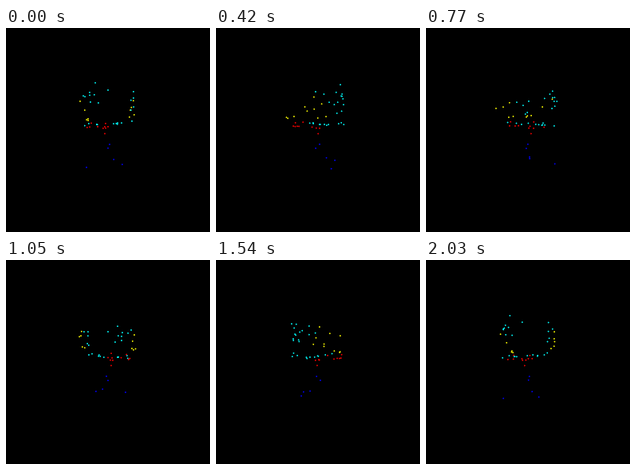
These frames come from a looping animation (256 by 256 pixels, 2100 ms). A matplotlib script:

```python
import numpy as np
import matplotlib.pyplot as plt
from matplotlib.animation import FuncAnimation

SIZE, FRAMES, INTERVAL = 256, 30, 70
FOCAL = SIZE / 2 / np.tan(np.pi / 6)   # 60 degree field of view
RADIUS = 0.01 * SIZE / 2

CYAN, YELLOW, RED, BLUE = (0, 1, 1), (1, 1, 0), (1, 0, 0), (0, 0, 1)

# Chair samples: (right, up, towards viewer), in pixels at the turning axis
BACK = [
    (-13.7, 51, 31), (0, 43.2, 30.5), (-30, 41.4, 7), (-26.9, 38.8, 15.5),
    (-20.2, 41.4, 27.5), (-19.5, 37.1, 33), (-14.7, 37.7, 33),
    (-19.2, 30.5, 29), (-10.3, 28.8, 34), (28.1, 42.4, 26.6),
    (31, 39, 6.5), (26.9, 34.9, 14.8), (28.7, 25.7, 24.6), (26.3, 22.8, 18.5),
]
SEAT = [
    (26.7, 9.9, 24.6), (18.4, 9.5, -18), (10.8, 8.5, -10), (10.7, 7.9, 24),
    (6, 6.7, 31.5), (11.8, 7.3, -0.8), (-24, 8, 2), (-26.8, 5, 18.5),
    (-13, 6.3, 17), (-13.5, 6.5, 12.3), (-13, 6.5, 6),
]
ARMS = [
    (32.5, 37.5, -5), (31.5, 30.4, -16), (31.5, 27.8, -27), (28, 17, -9.5),
    (32.5, 19, 1.5), (-34, 35, 6.5), (-30, 25.5, -5.5), (-27.3, 15.4, -20),
    (-30.2, 14.4, -28), (-28, 13.4, -27.5),
]
BASE = [
    (-4, -4.5, 1.5), (-22, 9, -11), (-3.5, 9.3, -29.5), (0, 4.8, -28.5),
    (-4.6, 4.6, -24), (-14.5, 4.7, -27), (-25, 4, -19.6), (-26, 3.2, 1.5),
    (-6, 2.2, 4), (-3, 2.4, -1.3),
]
LEGS = [
    (2, -18, 1.5), (0, -23, -3), (7, -35.5, 9), (16.4, -39.8, 18),
    (-24.2, -42, 23),
]

PARTS = [(BACK, CYAN), (SEAT, CYAN), (ARMS, YELLOW), (BASE, RED), (LEGS, BLUE)]
points = np.array([p for part, _ in PARTS for p in part], float)
colors = np.array([c for part, c in PARTS for _ in part], float)


def project(angle):
    x, y, z = points.T
    c, s = np.cos(angle), np.sin(angle)
    depth = z * c - x * s
    scale = 1 / (1 - depth / FOCAL)
    return (SIZE / 2 + (x * c + z * s) * scale,
            SIZE / 2 - y * scale, depth)


def render(i):
    """Soft round splats, blended from far to near."""
    img = np.zeros((SIZE, SIZE, 3))
    px, py, depth = project(2 * np.pi * i / FRAMES)
    for k in np.argsort(depth):
        x0, y0 = int(px[k]) - 2, int(py[k]) - 2
        gy, gx = np.mgrid[y0:y0 + 5, x0:x0 + 5] + 0.5
        d2 = (gx - px[k]) ** 2 + (gy - py[k]) ** 2
        alpha = np.clip(1 - d2 / RADIUS ** 2, 0, 1)[..., None]
        tile = img[y0:y0 + 5, x0:x0 + 5]
        tile += alpha * (colors[k] - tile)
    return img


fig = plt.figure(figsize=(SIZE / 100, SIZE / 100), dpi=100, facecolor="black")
ax = fig.add_axes([0, 0, 1, 1])
ax.axis("off")
view = ax.imshow(render(0), interpolation="nearest", aspect="auto")


def update(i):
    view.set_data(render(i))
    return (view,)


anim = FuncAnimation(fig, update, frames=FRAMES, interval=INTERVAL,
                     repeat=True, repeat_delay=0)
plt.show()
```
